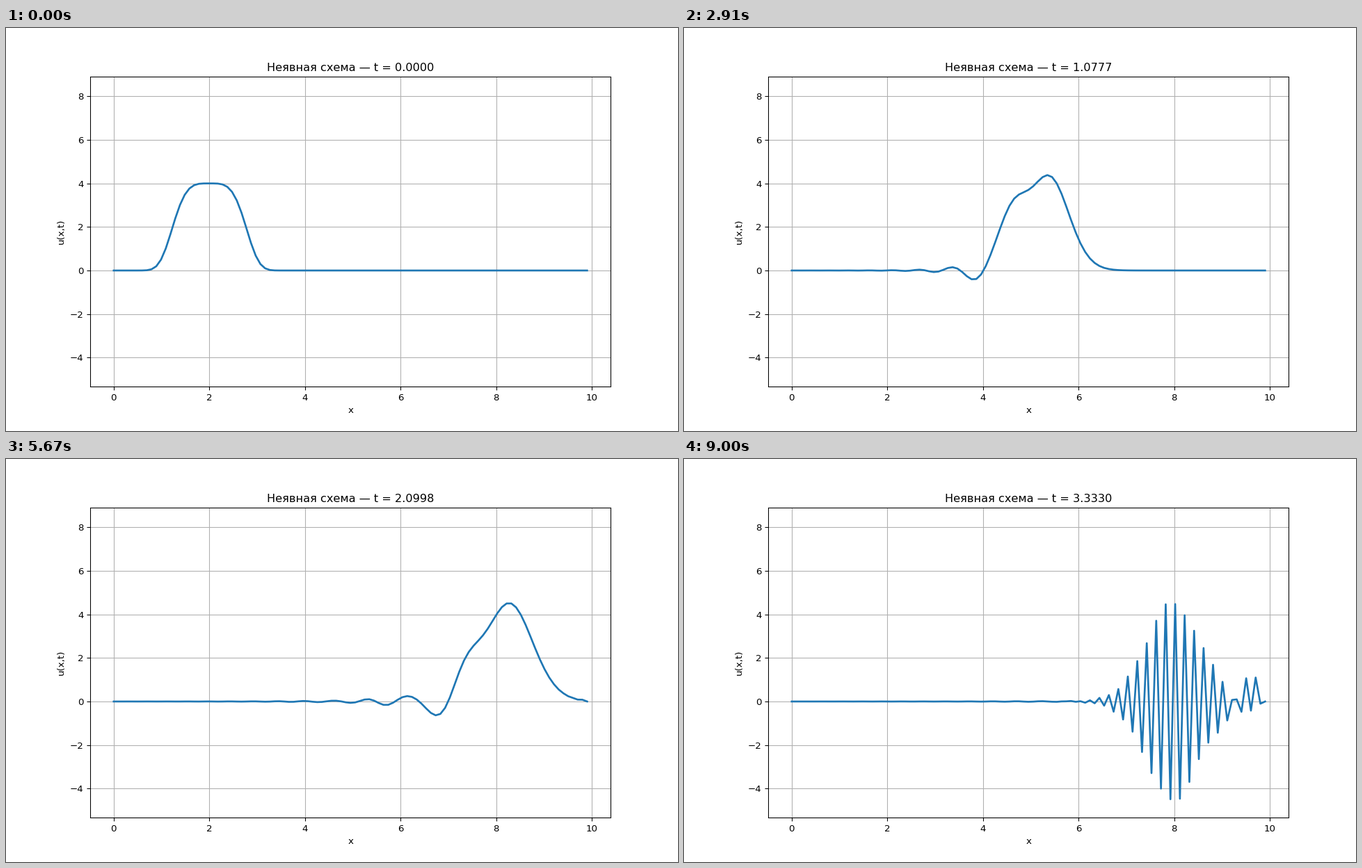
A matplotlib script that plays this animation: 966 px wide and 580 px high, repeating every 9030 ms.

```python
import numpy as np
import matplotlib.pyplot as plt
from matplotlib.animation import FuncAnimation

# Advection u_t + C u_x = 0, Crank-Nicolson with central differences
C, H, NX = 3.0, 0.1, 100
T, NT = 3.333, 300

x = np.linspace(0, 9.9, NX + 1)
dt = T / NT
sigma = C * dt / H


def solve():
    n = NX + 1
    shift = (np.eye(n, k=1) - np.eye(n, k=-1)) * sigma / 4
    left, right = np.eye(n) + shift, np.eye(n) - shift
    for row in (0, -1):
        left[row] = 0
        left[row, row] = 1
        right[row] = 0
    step = np.linalg.solve(left, right)

    u = np.empty((NT + 1, n))
    u[0] = 4 * np.exp(-2 * (x - 2) ** 4)
    for k in range(NT):
        u[k + 1] = step @ u[k]
    return u


u = solve()

plt.rcParams["font.family"] = "DejaVu Sans"
# 966 x 580 pixels
fig, ax = plt.subplots(figsize=(10, 6.0042), dpi=96.6)
line, = ax.plot(x, u[0], lw=2)
ax.set_ylim(-5.337, 8.918)
ax.set_xlabel("x")
ax.set_ylabel("u(x,t)")
ax.grid(True)
title = ax.set_title("")


def update(k):
    line.set_ydata(u[k])
    title.set_text(f"Неявная схема — t = {k * dt:.4f}")
    return line, title


anim = FuncAnimation(fig, update, frames=NT + 1, interval=30,
                     repeat=True, repeat_delay=0, blit=False)
plt.show()
```
